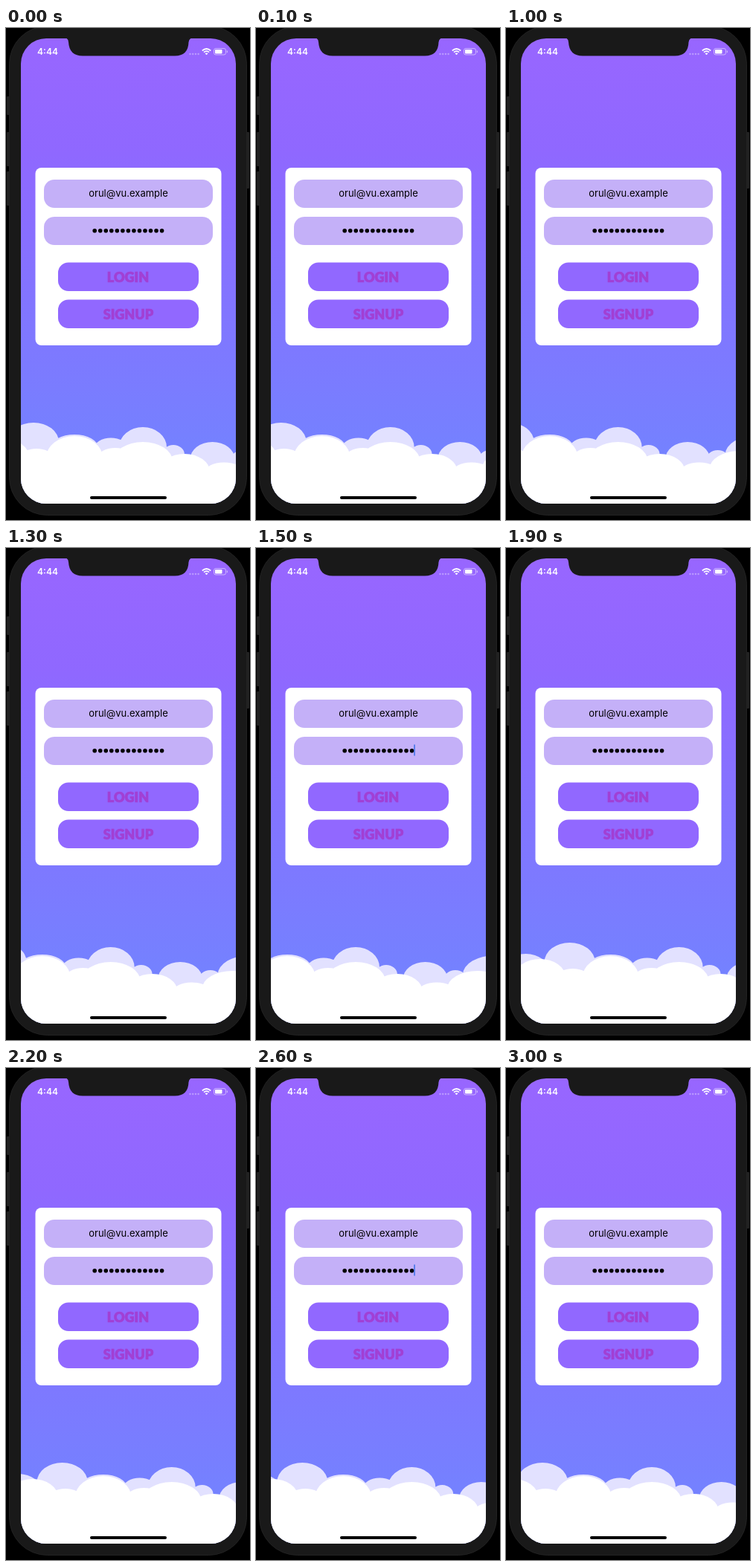
Recreate the animation shown at these times as an HTML page. Size 328 px wide and 662 px high, loop 3100 ms.

```html
<!DOCTYPE html>
<html lang="en">
<head>
<meta charset="utf-8">
<title>Login screen with drifting clouds</title>
<style>
  html, body { margin: 0; width: 100%; height: 100%; overflow: hidden; background: #000; }
  svg { display: block; width: 328px; height: 662px; }
  text { font-family: Inter, Roboto, sans-serif; text-anchor: middle; }
  .button { font: 900 18px Lato, sans-serif; fill: #a140d4; stroke: #a140d4; stroke-width: .7; }
</style>
</head>
<body>
<svg viewBox="0 0 328 662">
  <defs>
    <linearGradient id="sky" x2="0" y2="1">
      <stop offset="0" stop-color="#9866ff"/>
      <stop offset=".25" stop-color="#8f68ff"/>
      <stop offset=".85" stop-color="#7680ff"/>
      <stop offset="1" stop-color="#7086ff"/>
    </linearGradient>
    <clipPath id="screen"><rect x="20" y="14" width="289" height="626" rx="34"/></clipPath>
  </defs>

  <g fill="#222">
    <rect x="1" y="92" width="6" height="25" rx="1"/>
    <rect x="1" y="140" width="6" height="46" rx="1"/>
    <rect x="1" y="193" width="6" height="46" rx="1"/>
    <rect x="321" y="140" width="6" height="76" rx="1"/>
  </g>
  <rect x="4.5" y="-2.5" width="319" height="658" rx="51" fill="#191919" stroke="#222"/>

  <g clip-path="url(#screen)">
    <rect x="20" y="14" width="289" height="626" fill="url(#sky)"/>
    <g id="clouds">
      <path id="back" fill="#e2e1ff"/>
      <path id="front" fill="#fff"/>
    </g>
    <path d="M79 13Q84 14 84 19Q85 37.500 103 37.500H227Q245 37.500 245.500 19Q246 14 251 13Z" fill="#191919"/>
  </g>
  <rect x="113" y="630" width="103" height="4" rx="2"/>

  <g fill="#fff">
    <text x="56" y="36" font-size="12" font-weight="600">4:44</text>
    <g opacity=".35">
      <circle cx="247.500" cy="35" r="1.200"/><circle cx="251.200" cy="35" r="1.200"/>
      <circle cx="254.900" cy="35" r="1.200"/><circle cx="258.600" cy="35" r="1.200"/>
    </g>
    <g fill="none" stroke="#fff" stroke-width="1.700">
      <path d="M263.800 30.500Q269.500 25.500 275.200 30.500M266 32.700Q269.500 29.700 273 32.700"/>
    </g>
    <path d="M267.500 34.200Q269.500 32.700 271.500 34.200L269.500 36.300Z"/>
    <rect x="279.500" y="27.500" width="16" height="8.500" rx="2.500" fill="none" stroke="#fff" stroke-opacity=".5"/>
    <rect x="281" y="29" width="9.500" height="5.500" rx="1"/>
    <rect x="296.800" y="30.300" width="1.200" height="3" rx=".6" opacity=".5"/>
  </g>

  <rect x="39.500" y="188" width="250" height="239" rx="8" fill="#fff"/>
  <g fill="#c4b0f8">
    <rect x="51" y="204" width="227" height="38" rx="14"/>
    <rect x="51" y="254" width="227" height="38" rx="14"/>
  </g>
  <text x="164.500" y="227.300" font-size="13">orul@vu.example</text>
  <g id="dots"></g>
  <rect id="cursor" x="212.300" y="264.500" width="1.500" height="15" fill="#3b6fe6"/>
  <g fill="#9168ff">
    <rect x="70" y="315.500" width="189" height="38.500" rx="14"/>
    <rect x="70" y="365.500" width="189" height="38.500" rx="14"/>
  </g>
  <text class="button" x="164" y="341.500">LOGIN</text>
  <text class="button" x="164.500" y="391.500">SIGNUP</text>
</svg>
<script>
const LOOP = 3100;
const $ = id => document.getElementById(id);

// Each bump: centre x, top y, horizontal radius, vertical radius.
const backBumps = [
  [-22, 546, 32, 25], [37, 531, 34, 26], [92, 547, 32, 18], [141, 551.5, 22, 14],
  [184, 537, 32, 27], [225, 561, 15, 13], [277.5, 557, 30, 23], [318, 568, 16, 14],
  [372, 548, 44, 26]
];
const frontBumps = [
  [-3, 553, 34, 24], [41, 566, 22, 12], [92, 549, 38, 29], [147, 565, 24, 14],
  [184, 557, 40, 26], [240, 573, 34, 24], [293, 584.5, 26, 14], [348, 569, 41, 24]
];
const cloudPath = (bumps, base) => bumps.map(([x, top, rx, ry]) =>
  `M${x - rx} 640V${top + ry}a${rx} ${ry} 0 0 1 ${2 * rx} 0V640Z`
).join('') + `M-60 640V${base}H420V640Z`;

$('back').setAttribute('d', cloudPath(backBumps, 576));
$('front').setAttribute('d', cloudPath(frontBumps, 594));
$('dots').innerHTML = Array.from({ length: 13 }, (_, i) =>
  `<circle cx="${119.2 + i * 7.53}" cy="272.800" r="2.800"/>`).join('');

// The picture advances in 100 ms steps, with two longer holds early on.
function stepTime(t) {
  if (t >= 100 && t < 1000) return 100;
  if (t >= 1000 && t < 1300) return 1000;
  return Math.floor(t / 100) * 100;
}

function draw(now) {
  const t = stepTime(now % LOOP);
  const shift = (t < 1900 ? 0 : 112) - t / 30;
  $('clouds').setAttribute('transform', `translate(${shift.toFixed(2)})`);
  const cursorOn = (t >= 1400 && t < 1900) || (t >= 2400 && t < 2900);
  $('cursor').setAttribute('opacity', cursorOn ? 1 : 0);
  requestAnimationFrame(draw);
}
draw(0);
</script>
</body>
</html>
```
